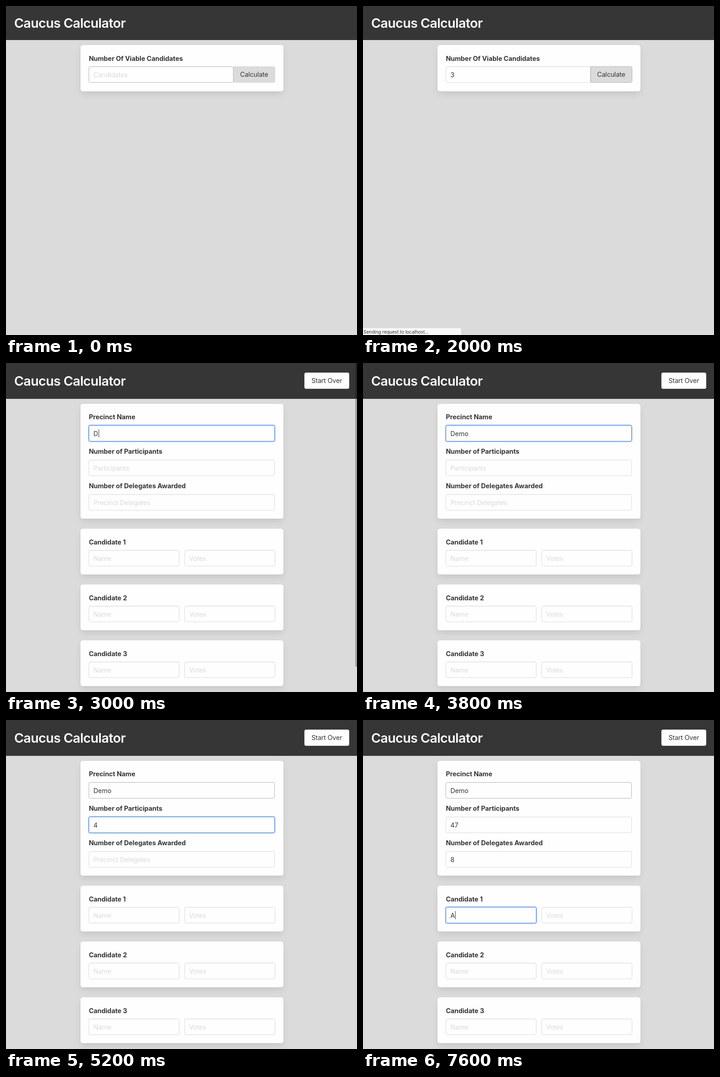
An HTML page for the animation above (8 s loop, 773 by 725 pixels).

```html
<!DOCTYPE html>
<html lang="en">
<head>
<meta charset="utf-8">
<title>Caucus Calculator</title>
<style>
  html, body { margin: 0; width: 100%; height: 100%; overflow: hidden; }
  body { position: relative; background: #dbdbdb; color: #363636;
    font: 14.4px Inter, "Open Sans", sans-serif; letter-spacing: -.011em; }
  div { box-sizing: border-box; white-space: nowrap; }
  .page, .page div, .status { position: absolute; }
  .page { inset: 0; visibility: hidden; }
  .page.on { visibility: visible; }
  .page .head { left: 0; top: 0; width: 100%; padding-left: 18px; background: #363636; color: #fff;
    font-size: 28.8px; font-weight: 600; letter-spacing: -.021em; }
  .page .card { left: 164px; width: 446.5px; border-radius: 5.4px; background: #fefefe;
    box-shadow: 0 7.2px 14.4px -1.8px rgba(10,10,10,.1), 0 0 0 1px rgba(10,10,10,.02); }
  .page .label { left: 182.4px; line-height: 20px; font-weight: 700; letter-spacing: -.003em; }
  .page .field { height: 36px; padding-left: 9.2px; display: flex; align-items: center;
    border: 1px solid #dbdbdb; border-radius: 3.6px; background: #fefefe;
    box-shadow: inset 0 1px 2px rgba(10,10,10,.04); }
  .page .field.hover { border-color: #b5b5b5; }
  .page .field.focus { border-color: #3273dc; box-shadow: 0 0 0 1.8px rgba(50,115,220,.25); }
  .field.empty { color: #dadada; }
  .field i { width: 1px; height: 18px; background: #363636; margin: 0 -1px 0 1px; visibility: hidden; }
  .field.empty i { order: -1; margin: 0 -1px 0 0; }
  .field.caret i { visibility: visible; }
  .page .button { height: 36px; line-height: 34px; text-align: center;
    border: 1px solid #dbdbdb; border-radius: 3.6px; background: #fefefe; }
  .page .button.grey { background: #dbdbdb; border-radius: 0 3.6px 3.6px 0; }
  .page .button.hover { border-color: #b5b5b5; }
  .page .bar { left: 769px; top: -4px; width: 8px; height: 674px; border-radius: 4px; background: rgba(0,0,0,.52); }
  .status { left: 0; top: 710px; width: 215.5px; height: 16px; padding-left: 1px; line-height: 17px;
    border-radius: 0 3px 0 0; background: #f8f8f8; font-size: 10px; letter-spacing: 0; visibility: hidden; }
</style>
</head>
<body>
<script>
  const LOOP = 8000;
  const fields = {};

  function add(parent, cls, text, box = {}) {
    const el = document.createElement('div');
    el.className = cls;
    el.textContent = text;
    for (const k in box) el.style[k] = box[k] + 'px';
    return parent.appendChild(el);
  }

  function addPage(headHeight, titleY) {
    const page = add(document.body, 'page', '');
    add(page, 'head', 'Caucus Calculator', { height: headHeight }).style.lineHeight = titleY * 2 + 'px';
    return page;
  }

  const addCard = (page, top, height) => add(page, 'card', '', { top, height });
  const addLabel = (page, y, text) => add(page, 'label', text, { top: y - 10 });

  function addField(page, id, hint, left, top, width) {
    const el = add(page, 'field', '', { left, top, width });
    const text = el.appendChild(document.createElement('span'));
    el.appendChild(document.createElement('i'));
    fields[id] = { el, text, hint };
  }

  // Opening form
  const intro = addPage(75, 38);
  addCard(intro, 86, 101.5);
  addLabel(intro, 115.5, 'Number Of Viable Candidates');
  addField(intro, 'count', 'Candidates', 182.4, 133, 319);
  const calc = add(intro, 'button grey', 'Calculate', { left: 500.5, top: 133, width: 92 });

  // Precinct form
  const form = addPage(79, 39.8);
  add(form, 'button', 'Start Over', { left: 657, top: 21, width: 99 });
  addCard(form, 90, 253);
  [['name', 'Precinct Name', 'Name'],
   ['people', 'Number of Participants', 'Participants'],
   ['seats', 'Number of Delegates Awarded', 'Precinct Delegates']
  ].forEach(([id, label, hint], i) => {
    addLabel(form, 119 + 76 * i, label);
    addField(form, id, hint, 182.4, 137 + 76 * i, 410);
  });
  for (let i = 1; i <= 3; i++) {
    const y = 242 + 123 * i;
    addCard(form, y, 101);
    addLabel(form, y + 29.5, 'Candidate ' + i);
    addField(form, 'cand' + i, 'Name', 182.4, y + 47, 199.5);
    addField(form, 'votes' + i, 'Votes', 393, y + 47, 199.5);
  }
  const bar = add(form, 'bar', '');
  const status = add(document.body, 'status', 'Sending request to localhost...');

  // Each step changes part of the state; "type" sets the text of one field.
  const steps = [
    [0, { page: intro, hover: 'count', focus: '', caret: false, status: false, bar: 0 }],
    [200, { focus: 'count', caret: true }],
    [600, { type: ['count', '3'] }],
    [1000, { hover: 'calc' }],
    [1200, { caret: false }],
    [1600, { caret: true }],
    [1800, { focus: '', caret: false }],
    [2000, { status: true }],
    [2200, { page: form, hover: 'name', status: false, bar: 1 }],
    [2600, { focus: 'name', caret: true }],
    [3000, { type: ['name', 'D'], bar: .5 }],
    [3200, { type: ['name', 'De'], bar: 0 }],
    [3400, { type: ['name', 'Dem'] }],
    [3600, { type: ['name', 'Demo'] }],
    [3800, { caret: false }],
    [4000, { caret: true }],
    [4200, { focus: 'people' }],
    [4600, { caret: false }],
    [5000, { type: ['people', '4'], caret: true }],
    [5200, { caret: false }],
    [5600, { type: ['people', '47'], caret: true }],
    [6000, { focus: 'seats' }],
    [6600, { type: ['seats', '8'] }],
    [7000, { focus: 'cand1' }],
    [7600, { type: ['cand1', 'A'] }]
  ];

  function show(index) {
    const s = {}, values = {};
    for (const [, change] of steps.slice(0, index + 1)) {
      Object.assign(s, change);
      if (change.type) values[change.type[0]] = change.type[1];
    }
    intro.classList.toggle('on', s.page === intro);
    form.classList.toggle('on', s.page === form);
    for (const id in fields) {
      const { el, text, hint } = fields[id];
      const active = s.focus === id;
      text.textContent = values[id] || hint;
      el.classList.toggle('empty', !values[id]);
      el.classList.toggle('hover', s.hover === id);
      el.classList.toggle('focus', active);
      // Visibility is inherited per page, so only the open page may show a caret.
      el.classList.toggle('caret', active && s.caret);
    }
    calc.classList.toggle('hover', s.hover === 'calc');
    status.style.visibility = s.status ? 'visible' : 'hidden';
    bar.style.opacity = s.bar;
  }

  let shown = -1;
  const start = performance.now();
  function tick() {
    const t = (performance.now() - start) % LOOP;
    const index = steps.filter(([at]) => at <= t).length - 1;
    if (index !== shown) show(shown = index);
    requestAnimationFrame(tick);
  }
  tick();
</script>
</body>
</html>
```
